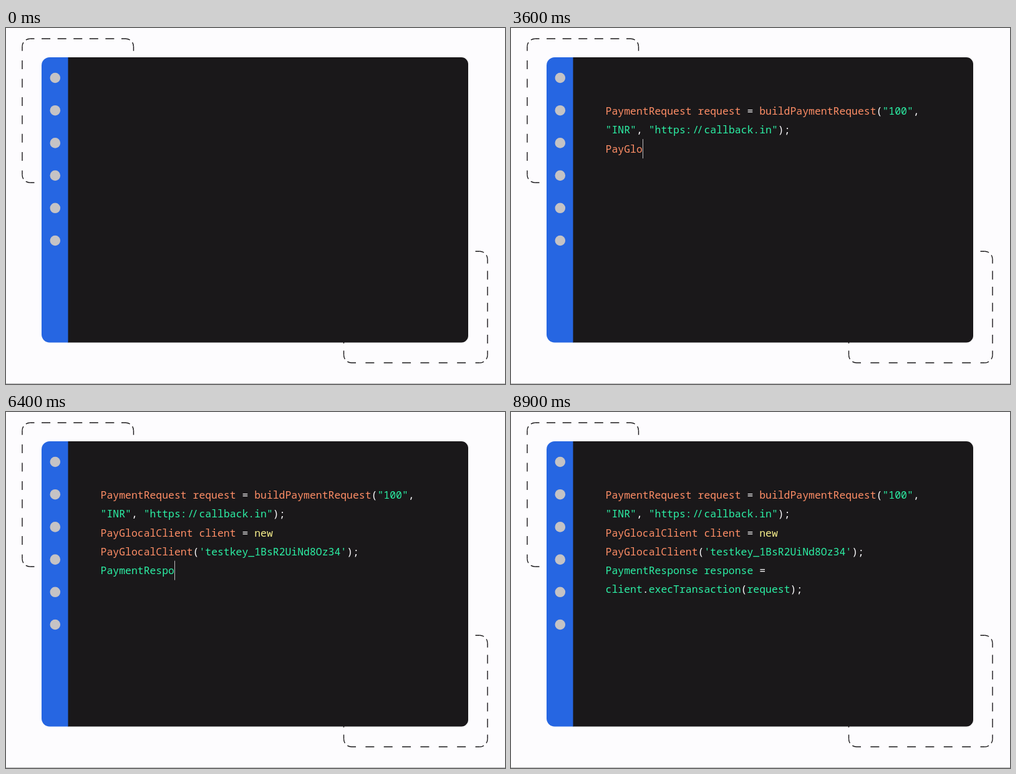
Write an HTML page that moves like this. It is 800 px wide and 571 px high and loops after 9000 ms.

```html
<!DOCTYPE html>
<html lang="en">
<head>
<meta charset="utf-8">
<title>Typed payment code</title>
<style>
  html, body { margin: 0; width: 100%; height: 100%; overflow: hidden; background: #fdfcfe; }
  svg { display: block; width: 100vw; height: 100vh; }
  .dashes { fill: none; stroke: #1a181a; stroke-width: 1.4; }
  text {
    font: 16.46px "Noto Sans Mono", "DejaVu Sans Mono", monospace;
    font-variant-ligatures: none;
    white-space: pre;
  }
  .o { fill: #ff8e66; }
  .g { fill: #2cf0a5; }
  .w { fill: #fdfcfe; }
  .y { fill: #f6ee8b; }
</style>
</head>
<body>
<svg viewBox="0 0 800 571">
  <rect width="800" height="571" fill="#fdfcfe"/>
  <rect y="570" width="800" height="1" fill="#b4b3b5"/>
  <g id="frames" class="dashes"></g>
  <path fill="#1a181a" d="M99 47H730a11 11 0 0 1 11 11V493.5a11 11 0 0 1 -11 11H99z"/>
  <path fill="#2666e2" d="M99.5 47H70a13 13 0 0 0 -13 13V491.5a13 13 0 0 0 13 13H99.5z"/>
  <g id="dots" fill="#c5c3c5"></g>
  <g id="code"></g>
  <rect id="caret" width="1" height="31" fill="#bdbbbd"/>
</svg>
<script>
const LOOP = 9000, TICK = 100, CARET_OFF = 8900;
const LEFT = 151.9, BASE = 139.2, LEADING = 30.2, PITCH = 9.876;

// Each token is a colour class followed by its text.
const lines = [
  ['oPaymentRequest request', 'w = ', 'obuildPaymentRequest', 'w(', 'g"100"', 'w,'],
  ['g"INR"', 'w, ', 'g"https:', 'g//', 'gcallback.in"', 'w);'],
  ['oPayGlocalClient client', 'w = ', 'ynew'],
  ['oPayGlocalClient', 'w(', "g'testkey_1BsR2UiNd8Oz34'", 'w);'],
  ['gPaymentResponse response', 'w ='],
  ['gclient', 'w.', 'gexecTransaction', 'w(', 'grequest', 'w);']
];

// Typing pace: [time in ms, characters typed]
const pace = [[0, 0], [1300, 36], [2700, 69], [3600, 87], [5800, 151], [7100, 179], [8600, 209]];

const byId = id => document.getElementById(id);

function add(parent, name, attrs) {
  const el = document.createElementNS('http://www.w3.org/2000/svg', name);
  for (const key in attrs) el.setAttribute(key, attrs[key]);
  return parent.appendChild(el);
}

// Rounded frame whose dashes are centred on the ends of every side.
function dashedFrame(x1, y1, x2, y2, nx, ny) {
  const r = 12.5, dash = 14;
  const l = x1 + r, t = y1 + r, R = x2 - r, b = y2 - r;
  const side = (d, length, n) => add(byId('frames'), 'path', {
    d, 'stroke-dasharray': `${dash} ${length / n - dash}`, 'stroke-dashoffset': dash / 2
  });
  const arc = (x, y, dx, dy) => `M${x} ${y}a${r} ${r} 0 0 1 ${dx} ${dy}`;
  side(`M${l} ${y1}H${R}M${l} ${y2}H${R}`, R - l, nx);
  side(`M${x1} ${t}V${b}M${x2} ${t}V${b}`, b - t, ny);
  side(arc(x1, t, r, -r) + arc(R, y1, r, r) + arc(x2, b, -r, r) + arc(l, y2, -r, -r),
    r * Math.PI / 2, 1);
}

dashedFrame(26, 17.2, 204.5, 248, 6, 7);
dashedFrame(541.5, 358.3, 772, 537, 7, 6);

for (let i = 0; i < 6; i++) add(byId('dots'), 'circle', { cx: 78.8, cy: 80 + i * 52.2, r: 8.3 });

const tokens = [];
lines.forEach((line, row) => {
  const text = add(byId('code'), 'text', { x: LEFT - 0.3, y: BASE + row * LEADING });
  let col = 0, afterSlashes = false;
  for (const part of line) {
    const str = part.slice(1);
    const el = add(text, 'tspan', { class: part[0] });
    if (str === '//') el.setAttribute('dx', '1.5 -3');
    if (afterSlashes) el.setAttribute('dx', '1.5');
    afterSlashes = str === '//';
    tokens.push({ el, str, row, col });
    col += str.length;
  }
});

function typedAt(t) {
  for (let i = 1; i < pace.length; i++) {
    const [t0, n0] = pace[i - 1], [t1, n1] = pace[i];
    if (t <= t1) return Math.floor(n0 + (n1 - n0) * (t - t0) / (t1 - t0) + 0.001);
  }
  return pace[pace.length - 1][1];
}

function draw(time) {
  const t = Math.floor(time % LOOP / TICK) * TICK;
  const count = typedAt(t);
  let left = count, row = 0, col = 0;
  for (const token of tokens) {
    const n = Math.min(left, token.str.length);
    const shown = token.str.slice(0, n);
    if (token.el.textContent !== shown) token.el.textContent = shown;
    if (n > 0) { row = token.row; col = token.col + n; }
    left -= n;
  }
  const caret = byId('caret');
  caret.setAttribute('x', Math.round(LEFT + col * PITCH));
  caret.setAttribute('y', 117.8 + row * LEADING);
  caret.setAttribute('visibility', count > 0 && t < CARET_OFF ? 'visible' : 'hidden');
}

const start = performance.now();
function frame() {
  draw(performance.now() - start);
  requestAnimationFrame(frame);
}
frame();
</script>
</body>
</html>
```
